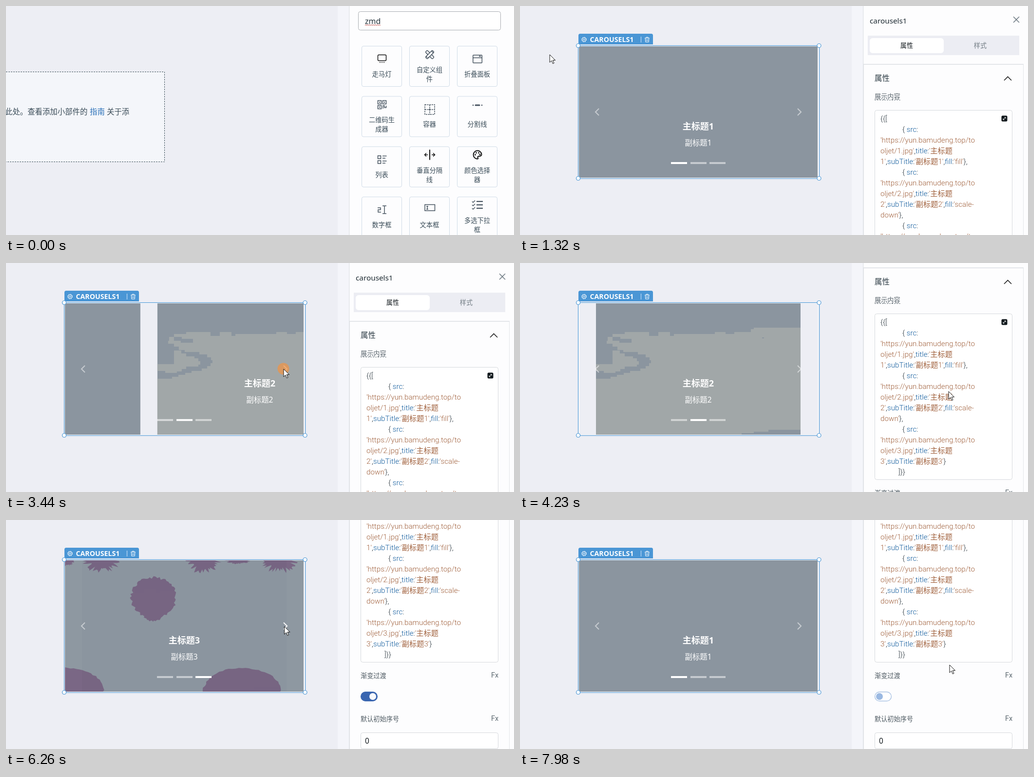
Recreate the animation shown at these times as an HTML page. Size 1043 px wide and 471 px high, loop 8000 ms.

```html
<!DOCTYPE html>
<html lang="zh-CN">
<head>
<meta charset="utf-8">
<title>Carousel</title>
<style>
html, body { margin: 0; width: 100%; height: 100%; overflow: hidden; background: #fff; }
svg { display: block; width: 100%; height: 100%; }
text { font-family: 'Noto Sans', 'Noto Sans CJK SC', 'Noto Sans CJK', sans-serif; fill: #3a4c58; white-space: pre; }
.mid { text-anchor: middle; }
.code text { font: 300 15.2px Roboto, 'Noto Sans CJK SC', 'Noto Sans CJK', sans-serif; }
.icon { fill: none; stroke: #46535f; stroke-width: 1.5; }
.white text { fill: #fff; }
</style>
</head>
<body>
<svg id="stage" viewBox="0 0 1043 471"></svg>
<script>
const LOOP = 8000;
const COL = 33.07, ROW = 10.93, RIGHT = 681.5, TOP = 82;
const SLATE = '#8b959f', LAND = '#a1a7a8', BLUE = '#4a96d5';

// [first, last, count] of the moments when the picture is refreshed
const REFRESH = [
  [100, 820, 8], [920, 1720, 9], [1820, 2530, 8], [2630, 3330, 8], [3440, 4230, 9],
  [4340, 5140, 9], [5240, 5960, 8], [6060, 6560, 6], [6760, 7480, 8], [7580, 7980, 5]
];
const MOMENTS = [0, ...REFRESH.flatMap(([a, b, n]) =>
  Array.from({ length: n }, (_, i) => a + (b - a) * i / (n - 1)))];

// Pointer path: time, x, y
const PATH = [
  [100, 840, 62], [300, 775, 112], [420, 770, 115], [820, 424, 154], [1220, 61, 100],
  [1320, 61, 100], [1720, 530, 140], [1980, 987, 72], [2220, 780, 237], [2530, 662, 232],
  [2800, 570, 218], [3480, 570, 218], [3900, 880, 260], [4700, 880, 270], [5040, 750, 361],
  [5150, 750, 361], [5540, 551, 237], [5720, 571, 219], [6740, 572, 219], [6960, 605, 224],
  [7300, 758, 360], [7480, 758, 360], [7980, 882, 298]
];
const SCROLL = [[3960, 0], [4230, 110], [4640, 263]];
const PRESSES = [[3050, 3500], [5050, 5160], [5700, 5870], [6730, 6800], [7390, 7490]];
const DRAG = 420, DROP = 1310;
const MOVES = [
  { at: 3074, from: 0, to: 1, slide: true },
  { at: 5740, from: 1, to: 2 },
  { at: 6740, from: 2, to: 0 }
];

const clamp = v => Math.max(0, Math.min(1, v));

function track(keys, t, i) {
  const n = keys.findIndex(k => k[0] > t);
  if (n === 0) return keys[0][i];
  if (n < 0) return keys[keys.length - 1][i];
  const a = keys[n - 1], b = keys[n], p = (t - a[0]) / (b[0] - a[0]);
  return a[i] + (b[i] - a[i]) * p;
}

function bezier(x1, y1, x2, y2) {
  const f = (s, a, b) => 3 * (1 - s) * (1 - s) * s * a + 3 * (1 - s) * s * s * b + s * s * s;
  return x => {
    let lo = 0, hi = 1;
    for (let i = 0; i < 24; i++) {
      const m = (lo + hi) / 2;
      if (f(m, x1, x2) < x) lo = m; else hi = m;
    }
    return f(lo, y1, y2);
  };
}
const easeInOut = bezier(.42, 0, .58, 1), ease = bezier(.25, .1, .25, 1);

// Markup helpers
const rect = (x, y, w, h, attrs = '') => `<rect x="${x}" y="${y}" width="${w}" height="${h}" ${attrs}/>`;
const path = (d, attrs = '') => `<path d="${d}" ${attrs}/>`;
const line = (x1, y1, x2, y2, attrs = '') => `<line x1="${x1}" y1="${y1}" x2="${x2}" y2="${y2}" ${attrs}/>`;
const poly = (points, attrs = '') => `<polyline points="${points}" ${attrs}/>`;
const dot = (x, y, r, attrs = '') => `<circle cx="${x}" cy="${y}" r="${r}" ${attrs}/>`;
const text = (x, y, size, s, attrs = '') => `<text x="${x}" y="${y}" font-size="${size}" ${attrs}>${s}</text>`;
const group = (id, body, attrs = '') => `<g id="${id}" ${attrs}>${body}</g>`;
const each = (list, fn) => list.map(fn).join('');

// Component list
const solid = 'fill="#46535f" stroke="none"', black = 'fill="#111" stroke="none"';
const dashed = 'stroke-dasharray="3 1.6"', dark = 'stroke="#111"';
const ICONS = {
  carousel: rect(-8.5, -7.5, 17, 12, 'rx="2" stroke="#111"') + each([-4, 0, 4], x => dot(x, 8, 1, black)),
  tools: each([45, -45], a => rect(-10, -2.7, 20, 5.4, `rx="1.5" fill="#fdfdfe" transform="rotate(${a})"`)) +
    line(4, -7, 7, -4) + line(-7, 4, -5, 6) + line(-4, 7, -2, 5),
  fold: rect(-9.2, -8, 18.5, 16, 'rx="1"') + line(-9, -2.5, 9, -2.5) + poly('3,-4.5 5,-6.5 7,-4.5'),
  matrix: each([[-8.5, -8.5], [1.5, -8.5], [-8.5, 1.5]], ([x, y]) => rect(x, y, 7, 7) + rect(x + 2.5, y + 2.5, 2, 2, solid)) +
    poly('2,8 2,2 5,2 5,6 8.5,6 8.5,2'),
  box: rect(-10, -10, 20, 20, dashed) + line(0, -10, 0, 10, dashed) + line(-10, 0, 10, 0, dashed) + dot(0, 0, 1.8, solid),
  divider: dot(-9, 0, 1.3, solid) + dot(9, 0, 1.3, solid) + line(-4, 0, 4, 0, 'stroke-width="3" stroke-linecap="round"'),
  list: rect(-8.5, -8, 6, 6) + rect(-8.5, 2, 6, 6) + each([-7.5, -3, 2.8, 7.2], (y, i) => line(1, y, i % 2 ? 7 : 9.5, y)),
  split: line(0, -10.5, 0, 10.5, 'stroke="#111" stroke-width="2"') +
    each([-1, 1], s => line(4 * s, 0, 10 * s, 0, dark) + poly(`${7 * s},-3.5 ${10.5 * s},0 ${7 * s},3.5`, dark)),
  palette: path('M 0 8.5 A 8.5 8.5 0 1 1 8.5 -1 C 8.5 2.5, 6 3, 3 3 C 0 3, 0 5, 1 6.5 C 1.5 8, 1 8.5, 0 8.5 Z', 'stroke="#111" stroke-width="2"') +
    each([[-4.5, 0], [-2.5, -4], [2.5, -4], [5, -.5]], ([x, y]) => dot(x, y, 1.4, black)),
  number: poly('-9,-4 -3,-4 -3,0 -8,0 -8,5 -2,5') + line(1, -8, 9, -8) + line(5, -8, 5, 8) + line(1, 8, 9, 8),
  input: rect(-10, -6.5, 20.5, 12.5) + line(-7, -3, -3, -3) + line(-5, -3, -5, 3) + line(-7, 3, -3, 3),
  checks: each([-7, 0, 7], y => poly(`-11,${y} -9,${y + 2} -5,${y - 2}`) + line(-2, y, 11, y, 'stroke-width="2.2"'))
};
const TILES = [
  ['carousel', 108, '走马灯'], ['tools', 100, '自定义组', '件'], ['fold', 109, '折叠面板'],
  ['matrix', 203, '二维码生', '成器'], ['box', 213, '容器'], ['divider', 204, '分割线'],
  ['list', 316, '列表'], ['split', 306, '垂直分隔', '线'], ['palette', 306, '颜色选择', '器'],
  ['number', 419, '数字框'], ['input', 415, '文本框'], ['checks', 409, '多选下拉', '框']
];
function tile([icon, iy, a, b], i) {
  const x = 730.5 + i % 3 * 98, y = 82.5 + Math.floor(i / 3) * 103.4, cx = x + 41;
  const label = (s, dy) => text(cx, y + dy, 13.3, s, 'class="mid"');
  return rect(x, y, 82, 83, `rx="3.5" fill="#fdfdfe" stroke="#d0dce8" id="tile${i}"`) +
    `<g class="icon" transform="translate(${cx + .5} ${iy})">${ICONS[icon]}</g>` +
    (b ? label(a, 53.5) + label(b, 72.5) : label(a, 62.5));
}
const listPanel = rect(723.5, 11.5, 292, 38, 'id="search" rx="4" fill="#fff"') +
  text(737, 37, 16, 'zmd', 'style="fill:#27343c"') +
  path('M 737 40 ' + 'l 2 -1.5 l 2 1.5 '.repeat(8), 'id="squiggle" fill="none" stroke="#c2504a"') +
  each(TILES, tile);

// Property panel
const entry = (n, tail, ...more) => [
  [785, '{ src:'], [740, "'https://yun.bamudeng.top/to"], [740, `oljet/${n}.jpg',title:'主标题`],
  [740, `${n}',subTitle:'副标题${n}'${tail}`], ...more.map(s => [740, s])
];
const CODE = [
  [740, '{{['],
  ...entry(1, ",fill:'fill'},"),
  ...entry(2, ",fill:'scale-", "down'},"),
  ...entry(3, '}'),
  [777, ']}}']
];
function codeLines() {
  let quoted = false;
  const span = s => {
    const string = quoted || s === "'";
    if (s === "'") quoted = !quoted;
    const color = string ? '#a0603c' : /^[a-z]/i.test(s) ? '#0f5a9c' : '#26323a';
    return `<tspan fill="${color}">${s}</tspan>`;
  };
  return each(CODE, ([x, row], i) =>
    `<text x="${x}" y="${237 + i * 22}">${each(row.match(/'|[a-z]+|[^'a-z]+/gi), span)}</text>`);
}
const fx = y => text(996, y, 14.5, 'Fx', 'style="fill:#5c6870;font-family:Roboto,sans-serif"');
const caps = (y, s) => text(728, y, 13.2, s, 'style="fill:#4d5961"') + fx(y - 1);
const propsPanel = text(718, 36, 15.3, 'carousels1', 'style="fill:#1d2a32"') +
  each([-6, 6], d => line(1019 - d, 22, 1019 + d, 34, 'stroke="#76818a" stroke-width="1.6"')) +
  rect(714, 61, 311, 40, 'fill="#ecedf3"') + rect(718, 66, 152, 31, 'rx="6" fill="#fff"') +
  text(794, 86, 13.2, '属性', 'class="mid" style="fill:#11181c"') +
  text(945, 86, 13.2, '样式', 'class="mid" style="fill:#737d85"') +
  line(705, 120, 1034, 120, 'stroke="#dcdfe3" stroke-width="1.5"') +
  text(728, 154, 15.4, '属性', 'style="fill:#2b3a43"') +
  poly('994,153 1001.5,145.5 1009,153', 'fill="none" stroke="#222" stroke-width="1.6"') +
  text(728, 191, 13.2, '展示内容', 'style="fill:#5a656d"') +
  line(728, 193.5, 781, 193.5, 'stroke="#7a848b" stroke-dasharray="3 2"') +
  rect(728.5, 214.5, 282, 341, 'rx="4" fill="#fff" stroke="#d6d9dd"') +
  `<g class="code">${codeLines()}</g>` +
  rect(988.5, 225.5, 12, 12, 'rx="2.5" fill="#11181c"') +
  `<g fill="none" stroke="#fff">${line(992, 234, 997, 229)}${poly('994.5,229 997,229 997,231.5')}${poly('992,231.5 992,234 994.5,234')}</g>` +
  caps(588, '渐变过渡') +
  rect(728.6, 616.6, 33.8, 18.8, 'id="switch" rx="9.4" stroke-width="1.2"') + dot(738, 626, 7, 'id="knob"') +
  caps(677, '默认初始序号') +
  rect(728.5, 700.5, 282, 33, 'rx="4" fill="#fff" stroke="#d6d9dd"') + text(737, 723, 15.4, '0', 'style="fill:#11181c"');

// Slides
function blob(cx, cy, rx, ry, rough, seed) {
  const points = Array.from({ length: 72 }, (_, i) => {
    seed = (seed * 16807) % 2147483647;
    const a = i * Math.PI / 36, r = 1 + (seed / 2147483647 - .5) * rough;
    return `${(cx + rx * r * Math.cos(a)).toFixed(1)},${(cy + ry * r * Math.sin(a)).toFixed(1)}`;
  });
  return `<polygon points="${points.join(' ')}" fill="#766381"/>`;
}
// Staircase outline: across to x, then down or up to y
const stairs = (x, y, list, fill) =>
  path(`M ${x} ${y} ` + list.map(([h, v]) => `H ${h} V ${v}`).join(' ') + ' Z', `fill="${fill}"`);
const caption = n => text(366, 254, 18, '主标题' + n, 'class="mid" font-weight="700"') +
  text(366, 287, 15.4, '副标题' + n, 'class="mid"');

const full = rect(121, 83, 490, 270, `fill="${SLATE}"`);
const SHORE = [
  [480, 136], [474, 142], [440, 146], [422, 142], [400, 146], [316, 150], [308, 142], [284, 150],
  [265, 142], [215, 146], [190, 152], [180, 160], [178, 166], [190, 172], [200, 179], [212, 183],
  [242, 188], [258, 194], [266, 200], [269, 206], [265, 212], [258, 217], [247, 222], [226, 226],
  [213, 230], [199, 234], [186, 238], [156, 353], [455, 350], [480, 347], [510, 343], [576, 133]
];
const SPIT = [
  [205, 186], [215, 192], [232, 196], [240, 202], [244, 209], [240, 213],
  [215, 218], [206, 223], [196, 226], [172, 222], [156, 208], [190, 180]
];
const river = rect(156, 83, 420, 270, `fill="${SLATE}"`) +
  stairs(576, 133, SHORE, LAND) + stairs(190, 180, SPIT, LAND) +
  rect(190, 152, 16, 8, `fill="${SLATE}"`) + rect(204, 156, 25, 8, `fill="${SLATE}"`) + rect(497, 153, 4, 2, `fill="${SLATE}"`);
const blobs = full + blob(303, 160, 46, 42, .13, 11) + blob(302, 194, 20, 14, .2, 5) +
  blob(126, 354, 75, 50, .07, 7) + blob(485, 354, 80, 50, .06, 9) +
  blob(127, 82, 13, 12, .4, 3) + blob(196, 82, 31, 23, .6, 21) + blob(405, 82, 30, 24, .6, 33) +
  blob(476, 82, 24, 8, .4, 4) + blob(562, 82, 31, 23, .6, 17);
const SLIDES = [full + caption(1), river + caption(2), blobs + caption(3)];

// Selected widget
const gear = dot(131.5, 69, 4) + dot(131.5, 69, 1.5) + dot(131.5, 69, 4.9, 'stroke-dasharray="2 1.85"');
const trash = line(256, 66, 266, 66) + poly('259,66 259,64.2 263,64.2 263,66') +
  poly('257.2,66.5 257.8,74 264.2,74 264.8,66.5') + each([259.8, 262.2], x => line(x, 68.5, x, 72));
const handles = each([[119.5, 81.5], [614, 81.5], [119.5, 354.5], [614, 354.5]],
  ([x, y]) => dot(x, y, 4, `fill="#fff" stroke="${BLUE}" stroke-width="1.2"`));
const chevron = (id, x, d) =>
  poly(`${x},211 ${x + d},218 ${x},225`, `id="${id}" fill="none" stroke="#fff" stroke-width="2.2"`);
const widget = rect(120, 57, 153, 22, `rx="3.5" fill="${BLUE}"`) + rect(120, 65, 153, 14, `fill="${BLUE}"`) +
  `<g fill="none" stroke="#fff">${gear}${trash}</g>` +
  line(248.5, 63, 248.5, 75, 'stroke="#b7d6f1" stroke-width="1.4"') +
  text(143.5, 74, 14.2, 'CAROUSELS1', 'font-weight="700" style="fill:#fff"') +
  rect(121, 82.3, 491.5, 271.9, 'fill="none" stroke="#fff" stroke-opacity=".7" stroke-width="1.6"') +
  `<g class="white" clip-path="url(#frame)">${each([1, 2, 0], i => group('slide' + i, SLIDES[i]))}</g>` +
  chevron('prev', 162, -7) + chevron('next', 570, 7) +
  each([310, 350, 389], (x, i) => rect(x, 321, 33, 4, `id="bar${i}" fill="#fff"`)) +
  rect(119.5, 81.5, 495.2, 273.4, `fill="none" stroke="${BLUE}" stroke-width="1.1"`) + handles;

// Empty canvas and drop grid
const hint = rect(-20, 135.5, 345.5, 185, 'fill="#f4f6fa" stroke="#3e525b" stroke-dasharray="3 2"') +
  text(-2, 223, 15.4, '此处。查看添加小部件的') +
  text(172, 223, 15.4, '指南', 'style="fill:#2a70b8"') + text(207, 223, 15.4, '关于添');
let grid = '';
for (let k = 0; k <= 20; k++) grid += line(RIGHT - k * COL, 0, RIGHT - k * COL, 471);
for (let k = -7; k < 36; k++) {
  const y = Math.floor(TOP + k * ROW) + .5;
  grid += line(0, y, 681, y);
}
const ghost = rect(.5, .5, 495, 274, `fill="#eaf3fc" stroke="${BLUE}"`) + rect(3, 3, 490, 268, 'fill="#70b0ee"');
const arrow = '<polygon points="0,0 0,16 3.8,12.5 6.4,18.6 8.9,17.5 6.3,11.6 11.5,11.6" fill="#fff" stroke="#111" stroke-linejoin="round"/>';

document.getElementById('stage').innerHTML =
  `<defs><clipPath id="frame">${rect(121, 83, 490, 270)}</clipPath></defs>` +
  rect(0, 0, 705, 471, 'fill="#f4f5fa"') + rect(0, 0, 681, 471, 'fill="#edeef4"') +
  group('hint', hint) + group('ghost', ghost) +
  group('grid', `<g stroke="#34495c" stroke-opacity=".055">${grid}</g>` +
    line(681.5, 0, 681.5, 471, 'stroke="#7d8790" stroke-dasharray="1 1"')) +
  group('widget', widget) +
  rect(705, 0, 338, 471, 'fill="#fdfdfe"') +
  group('list', listPanel) +
  group('props', group('sheet', propsPanel) +
    each([705.5, 1033.5], (x, i) => line(x, 120, x, 471, `id="edge${i}" stroke="#e3e5e8"`))) +
  line(704.8, 0, 704.8, 471, 'stroke="#d9dde2"') +
  group('pointer', dot(-.5, -.5, 12, 'id="halo"') + arrow +
    rect(4.5, 16.5, 10.5, 9.5, 'id="badge" fill="#fff" stroke="#111" stroke-dasharray="2 1"'));

const el = {};
document.querySelectorAll('[id]').forEach(e => { el[e.id] = e; });
const set = (id, attrs) => { for (const k in attrs) el[id].setAttribute(k, attrs[k]); };
const show = (id, on) => set(id, { display: on ? 'inline' : 'none' });
const move = (id, x, y) => set(id, { transform: `translate(${x} ${y})` });

function drawSlides(t) {
  const last = MOVES.filter(m => m.at <= t).pop();
  const raw = last ? clamp((t - last.at) / 600) : 1;
  const to = last ? last.to : 0, from = raw < 1 ? last.from : -1;
  const sliding = raw < 1 && last.slide;
  const p = easeInOut(raw), b = ease(raw);
  for (let i = 0; i < 3; i++) {
    show('slide' + i, i === to || i === from);
    set('slide' + i, { opacity: i === to && !sliding && raw < 1 ? p : 1 });
    move('slide' + i, !sliding ? 0 : i === to ? 490 * (1 - p) : -490 * p, 0);
    set('bar' + i, { opacity: i === to ? .5 + .5 * b : i === from ? 1 - .5 * b : .5 });
  }
}

function draw(t) {
  const x = track(PATH, t, 1), y = track(PATH, t, 2);
  const dragging = t >= DRAG && t < DROP, dropped = t >= DROP;
  show('hint', t < DRAG);
  show('grid', dragging);
  show('ghost', dragging);
  show('widget', dropped);
  show('list', !dropped);
  show('props', dropped);

  // The dragged outline snaps to the grid
  const col = Math.round((x + 59 - RIGHT) / COL), row = Math.round((y - 18 - TOP) / ROW);
  move('ghost', Math.round(RIGHT + col * COL - .5), Math.round(TOP + row * ROW - .5));

  set('search', { stroke: t < 300 ? '#a9adb2' : '#d8dbdf' });
  show('squiggle', t < 300);
  set('tile0', { fill: t >= 200 ? '#f4f5fa' : '#fdfdfe' });

  const scroll = track(SCROLL, t, 1);
  move('sheet', 0, -scroll);
  for (const id of ['edge0', 'edge1']) set(id, { y1: Math.max(0, 120 - scroll) });

  const on = clamp((t - 5080) / 150) - clamp((t - 7400) / 80);
  set('switch', { fill: on > .5 ? '#3a66b0' : '#fff', stroke: on > .5 ? '#3a66b0' : '#9bb8de' });
  set('knob', { cx: 738 + 15 * on, fill: on > .5 ? '#f8fafe' : '#9bb9e2' });

  drawSlides(t);
  const inside = y > 83 && y < 353;
  set('prev', { opacity: inside && x > 121 && x < 195 ? .9 : .5 });
  set('next', { opacity: inside && x > 538 && x < 611 ? .9 : .5 });

  const pressed = PRESSES.some(([a, b]) => t >= a && t < b), held = t >= 300 && t < DROP;
  show('pointer', t >= 100);
  move('pointer', x, y);
  show('halo', pressed || held);
  set('halo', { fill: pressed ? 'rgba(238,148,72,.75)' : 'rgba(253,200,95,.55)' });
  show('badge', dragging);
}

const start = performance.now();
function tick() {
  const t = (performance.now() - start) % LOOP;
  draw(MOMENTS.filter(m => m <= t + 1).pop());
  requestAnimationFrame(tick);
}
tick();
</script>
</body>
</html>
```
